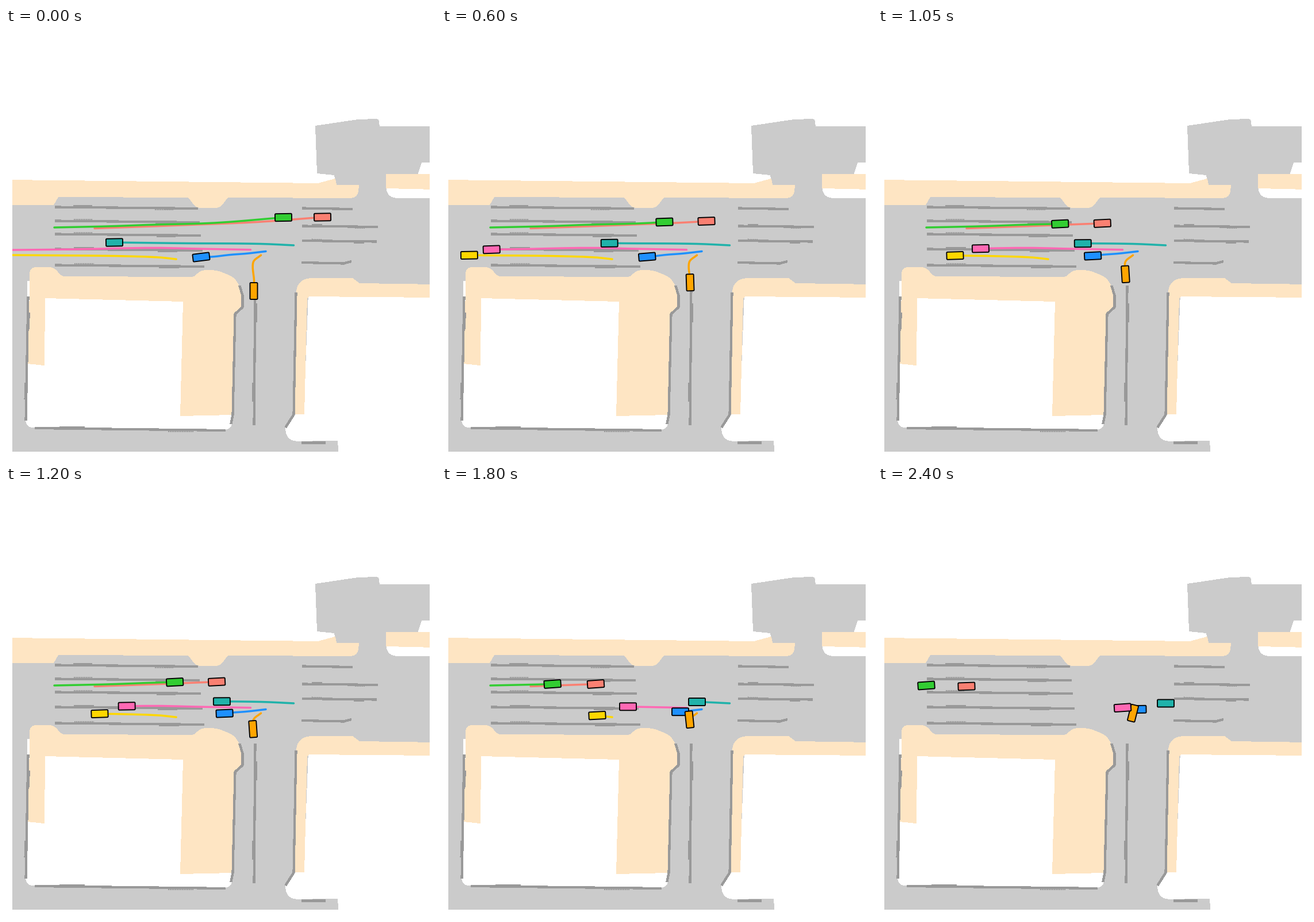
Animation, 748 px wide and 748 px high, one loop 2550 ms. Source, as a matplotlib script:

```python
import numpy as np
import matplotlib.pyplot as plt
from matplotlib.animation import FuncAnimation
from matplotlib.patches import FancyBboxPatch, PathPatch
from matplotlib.path import Path
from matplotlib.transforms import Affine2D

SIZE, DPI, MARGIN = 748, 100, 11
PT = 72 / DPI
FRAMES, INTERVAL = 17, 150
ROAD, WALK, LINE = "#cbcbcb", "#fee5c3", "#999999"

fig = plt.figure(figsize=(SIZE / DPI, SIZE / DPI), dpi=DPI, facecolor="white")
inset = MARGIN / SIZE
ax = fig.add_axes([inset, inset, 1 - 2 * inset, 1 - 2 * inset])
# Whole coordinates fall on pixel centres
ax.set_xlim(MARGIN - 0.5, SIZE - MARGIN - 0.5)
ax.set_ylim(SIZE - MARGIN - 0.5, MARGIN - 0.5)
ax.axis("off")


def toward(a, b, dist):
    return a + (b - a) * dist / np.hypot(*(b - a))


def area(color, *corners):
    """Filled polygon; a third value in a corner is its rounding."""
    pts = np.array([c[:2] for c in corners], float)
    verts, codes = [], []
    for i, corner in enumerate(corners):
        p, before, after = pts[i], pts[i - 1], pts[(i + 1) % len(pts)]
        if len(corner) == 3:
            r = corner[2]
            verts += [toward(p, before, r), p, toward(p, after, r)]
            codes += [Path.LINETO, Path.CURVE3, Path.CURVE3]
        else:
            verts.append(p)
            codes.append(Path.LINETO)
    codes[0] = Path.MOVETO
    verts.append(verts[0])
    codes.append(Path.LINETO)
    ax.add_patch(PathPatch(Path(verts, codes), fc=color, ec="none",
                           antialiased=False, zorder=1))


def lane(*points):
    """Grey marking; long straight ones get fine teeth along their sides."""
    pts = np.array(points, float)
    ax.plot(*pts.T, color=LINE, lw=3.2 * PT, solid_capstyle="butt",
            antialiased=False, zorder=2)
    a, b = pts[0], pts[-1]
    if len(pts) > 2 or np.hypot(*(b - a)) < 100:
        return
    normal = toward(np.zeros(2), np.array([a[1] - b[1], b[0] - a[0]]), 2.2)
    for along, side in ((0.13, -1), (0.7, 1)):
        run = a + np.outer([along, along + 0.13], b - a) + side * normal
        ax.plot(*run.T, color=LINE, lw=1.6 * PT, dashes=(0.7, 0.9),
                dash_capstyle="butt", antialiased=False, zorder=2)


# Roads
area(ROAD, (0, 280), (612, 280), (612, 270), (660, 270), (661, 296, 20),
     (SIZE, 296), (SIZE, SIZE), (0, SIZE))
area(ROAD, (538, 170), (612, 159), (647, 158, 4), (649, 171), (SIZE, 171),
     (SIZE, 233), (722, 233), (715, 255), (661, 255), (661, 276), (611, 276),
     (574, 272), (571, 255), (541, 252))

# Blocks and sidewalks
area("white", (37, 440), (395, 440), (392, 698, 14), (34, 694, 14))
area("white", (526, 460), (SIZE, 460), (SIZE, SIZE), (579, SIZE), (577, 717),
     (488, 718, 20), (486, 695), (501, 672), (518, 671))
area(WALK, (0, 264), (543, 270), (572, 262), (574, 273), (613, 273),
     (611, 295, 14), (385, 294), (371, 312, 8), (331, 312, 8), (317, 294),
     (90, 293), (82, 307), (0, 307))
area(WALK, (661, 254), (SIZE, 254), (SIZE, 280), (661, 278))
area(WALK, (37, 583), (41, 460), (41, 416, 12), (82, 416, 8), (96, 432, 6),
     (326, 433, 4), (340, 421, 8), (365, 421, 10), (398, 434, 14),
     (411, 462, 8), (411, 486), (398, 496), (392, 672), (303, 674),
     (308, 475), (67, 469), (66, 586))
area(WALK, (505, 435, 28), (602, 435), (614, 444), (SIZE, 446), (SIZE, 468),
     (523, 466, 6), (518, 671), (501, 671))

# Lane dividers
for y in (311, 335, 358, 384, 412):
    lane((85, y), (333 + 0.11 * (y - 311), y + 2.5))
for y, end in ((313, 602), (344, 646), (369.5, 644)):
    lane((515, y), (end, y + 1.5))
lane((514, 407.5), (587, 409), (600, 405.5))
lane((433, 448), (431, 690))

# Curbs
lane((38, 467), (34, 682))
lane((406, 448), (411, 465), (411, 485), (398, 497), (394, 672), (391, 688))
lane((504, 460), (500, 672), (486, 694))
lane((50, 695.5), (381, 699.5))
lane((513, 720), (554, 720))

# Each car passes its points at these time steps
STOPS = (0, 5, 10, 12, 16)
# Headings in degrees are given at these steps
TURNS = (0, 12, 16)
STEPS = np.arange(FRAMES)


def smooth(points):
    """Cubic Hermite position at every time step."""
    t, val = np.array(STOPS, float), np.array(points, float)
    slope = np.gradient(val, t, axis=0)
    i = np.clip(np.searchsorted(t, STEPS, "right") - 1, 0, len(t) - 2)
    h = (t[i + 1] - t[i])[:, None]
    u = (STEPS - t[i])[:, None] / h
    return ((1 + 2 * u) * (1 - u) ** 2 * val[i]
            + u * (1 - u) ** 2 * h * slope[i]
            + u * u * (3 - 2 * u) * val[i + 1]
            + u * u * (u - 1) * h * slope[i + 1])


class Car:
    def __init__(self, color, headings, points, last=FRAMES - 1, box=(29, 13)):
        w, h = box
        self.path = smooth(points)[:last + 1]
        self.heading = np.interp(STEPS, TURNS, headings)
        self.trail, = ax.plot([], [], color=color, lw=3.5 * PT, zorder=3,
                              solid_capstyle="round")
        self.body = FancyBboxPatch((-w / 2, -h / 2), w, h, fc=color,
                                   ec="black", lw=1.9 * PT, zorder=4,
                                   boxstyle="round,pad=0,rounding_size=1.5")
        ax.add_patch(self.body)

    def place(self, step):
        left = self.path[step:]
        self.body.set_visible(len(left) > 0)
        self.trail.set_visible(len(left) > 1)
        if len(left):
            self.trail.set_data(*left.T)
            self.body.set_transform(
                Affine2D().rotate_deg(-self.heading[step])
                .translate(*left[0]) + ax.transData)


cars = [
    Car("salmon", (1, 4, 2), [(550, 328.5), (436.5, 337), (317.5, 342),
                              (267, 344), (153.5, 348)]),
    Car("limegreen", (1, 4, 4), [(482, 329), (362.7, 338.5), (244.5, 342),
                                 (191.7, 344), (83.5, 346.5)]),
    Car("lightseagreen", (1, 0, 0), [(188, 372.5), (314, 374), (410.5, 374.5),
                                     (443, 375), (500, 377.5)]),
    Car("gold", (0, 3, 4), [(-68, 394), (75.5, 395), (218, 396.7),
                            (269.5, 398.7), (375, 415)], last=13),
    Car("dodgerblue", (7, 0, 1), [(339, 398), (361.5, 397.2), (395, 393.5),
                                  (414, 392.2), (451.5, 388)]),
    Car("orange", (0, 6, -14), [(430.5, 457), (431, 438), (428.7, 412.7),
                                (430, 405.7), (443, 394.7)], box=(13, 29)),
    Car("hotpink", (3, 0, 4), [(-31, 386), (115.5, 384.5), (269.5, 382),
                               (323, 383.3), (425, 385.2)]),
]


def update(step):
    for car in cars:
        car.place(step)
    return [part for car in cars for part in (car.trail, car.body)]


anim = FuncAnimation(fig, update, frames=FRAMES, interval=INTERVAL,
                     init_func=lambda: update(0), repeat=True, repeat_delay=0)
plt.show()
```
